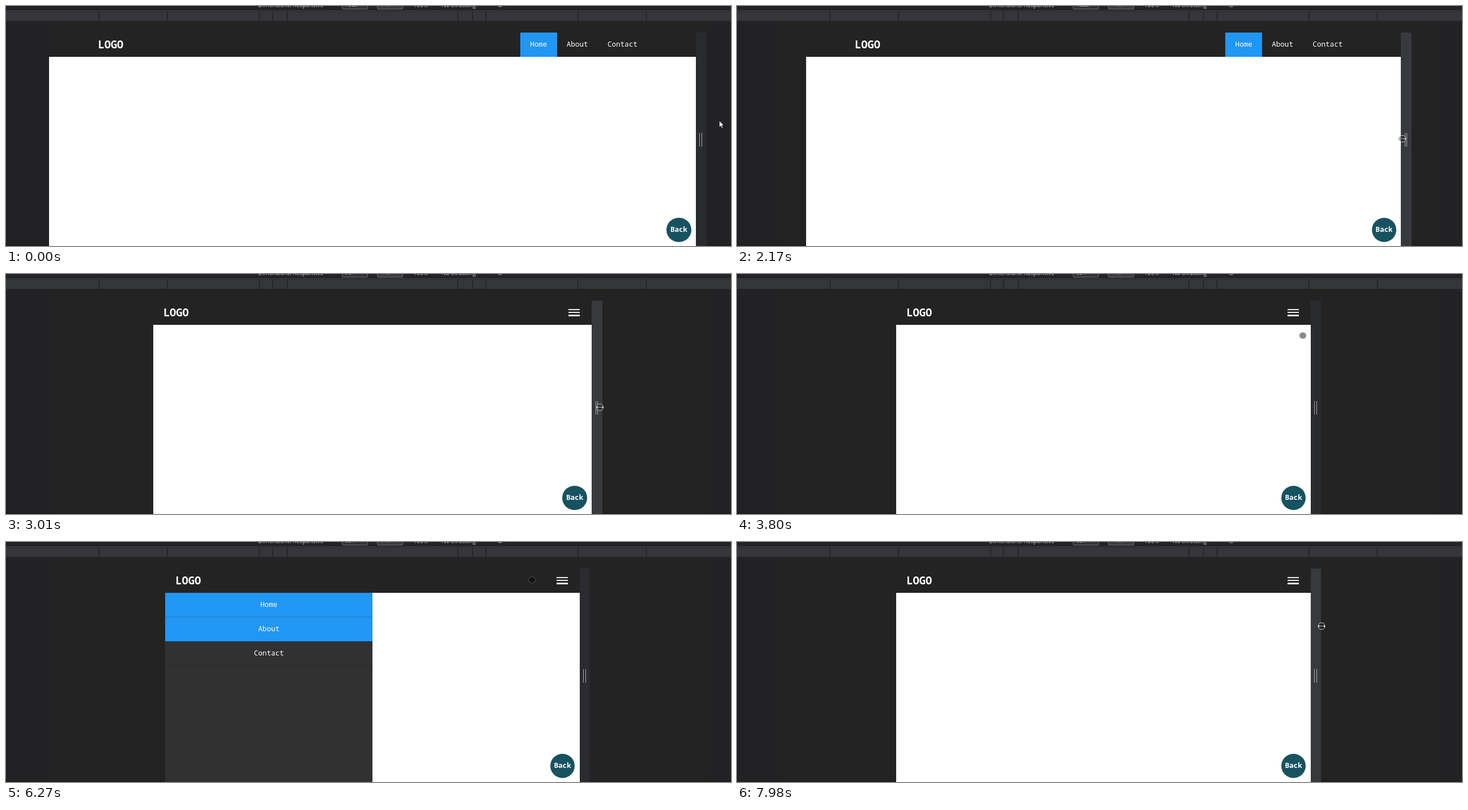
Write an HTML page that moves like this. It is 1280 by 425 pixels and loops after 8000 ms.

```html
<!DOCTYPE html>
<html lang="en">
<head>
<meta charset="utf-8">
<title>Responsive navigation</title>
<style>
/* --w: emulated width in CSS px, shown at a zoom of .8593 */
@property --w { syntax: "<integer>"; inherits: true; initial-value: 1329; }
@property --slide { syntax: "<percentage>"; inherits: true; initial-value: -100%; }
@property --about { syntax: "<color>"; inherits: true; initial-value: #313131; }
@property --bar { syntax: "<color>"; inherits: true; initial-value: #2a2b2e; }

html, body { margin: 0; width: 100%; height: 100%; overflow: hidden; background: #222225; }
.stage {
  --half: calc(var(--w) * .42965px);
  position: relative; width: 1280px; height: 425px; overflow: hidden;
  background: linear-gradient(#232323, #232323) 76px 27px / 1164px 398px no-repeat #222225;
  color: #fff; font: 500 12.6px "Noto Sans Mono", monospace;
  animation: resize 8s infinite linear, slide 8s infinite linear,
    about 8s infinite linear, bar 8s infinite step-end;
}
.stage div, .stage span, .stage svg { position: absolute; }
.floor { left: 0; bottom: 0; width: 100%; height: 3px; background: #211d20; }

/* device toolbar and ruler */
.tools { top: 0; left: 0; width: 100%; height: 8px; overflow: hidden; background: #232325;
  font: 10.2px/14px "Open Sans", sans-serif; color: #c8c9cb; }
.tools span { top: -9.2px; white-space: nowrap; }
.tools .field { top: -12px; box-sizing: border-box; width: 46px; height: 18px; padding: 2px 5px;
  line-height: 13px; border: 1px solid #6b6c6f; border-radius: 2px; background: #333437; }
.tools .off { color: #77787b; background: #3b3c3f; }
.w::before { counter-reset: w var(--w); content: counter(w); }
.ruler { top: 8px; left: 0; width: 100%; height: 19px;
  background: linear-gradient(#48494c 1px, #232325 1px 2px, #35363a 2px 18px, #2a2a2d 18px); }

/* emulated page */
.page { top: 47px; left: calc(647px - var(--half)); width: calc(var(--half) * 2); height: 378px;
  overflow: hidden; background: #fff; container-type: inline-size; }
.head { top: 0; left: 0; width: 100%; height: 43px; background: #232323; }
.logo { left: 86.5px; top: -.7px; font-size: 18.7px; font-weight: 700; line-height: 43px; }
.burger { display: none; right: 21px; top: 15px; width: 20px; height: 12.5px;
  background: linear-gradient(#ececec 2px, #0000 2px 5.2px, #ececec 5.2px 7.2px, #0000 7.2px 10.5px, #ececec 10.5px); }
ul { position: absolute; top: 0; right: 86px; margin: 0; padding: 0; display: flex; list-style: none; }
li { box-sizing: border-box; height: 43px; padding: 0 17.2px; line-height: 41.4px; }
li.on { background: #2196f3; }
.back { right: 8.3px; bottom: 7px; width: 43.4px; height: 43.4px; border-radius: 50%;
  background: #175260; font-weight: 700; line-height: 42.4px; text-align: center; }

@container (max-width: 825px) {
  .logo { left: 18px; }
  .burger { display: block; }
  ul { top: 43px; left: var(--slide); right: auto; width: 50%; height: 335px;
    display: block; background: #313131; }
  li { height: 42.95px; padding: 0; text-align: center; border-bottom: 1px solid #0002; }
  li.tap { background: var(--about); }
}

.bar { top: 47px; left: calc(647px + var(--half)); width: 18.4px; height: 378px; background: var(--bar); }
.bar span { left: 6.4px; top: 178px; width: 2.6px; height: 24px; border: solid #a9a9ab; border-width: 0 1.7px; }

/* pointer: its origin is the hot spot */
.pointer { left: 0; top: 0; animation: move 8s infinite linear; }
.pointer svg { left: -10px; top: -10px; }
.arrow { animation: arrow 8s infinite step-end; }
.grip { animation: grip 8s infinite step-end; }
.dot { animation: dot 8s infinite step-end; }

@keyframes resize {
  0%, 22% { --w: 1329; animation-timing-function: cubic-bezier(.5, .3, .75, .7); }
  27.125% { --w: 1223; }
  32%, 32.375% { --w: 1043; }
  33.5% { --w: 1017; animation-timing-function: cubic-bezier(.3, .4, .6, 1); }
  41.75%, 100% { --w: 851; }
}
@keyframes slide {
  0%, 53.25% { --slide: -100%; animation-timing-function: ease; }
  59.5%, 84.125% { --slide: 0%; animation-timing-function: ease; }
  90.375%, 100% { --slide: -100%; }
}
@keyframes about {
  0%, 67.1% { --about: #313131; animation-timing-function: ease; }
  70%, 100% { --about: #2196f3; }
}
@keyframes bar {
  0%, 46.25% { --bar: #2a2b2e; }
  15%, 94.7% { --bar: #38393d; }
  100% { --bar: #38393d; }
}
@keyframes move {
  0%, 12% { transform: translate(1259px, 203px); animation-timing-function: ease-in-out; }
  15.75%, 22% { transform: translate(1232px, 234px); animation-timing-function: cubic-bezier(.5, .3, .75, .7); }
  27.125% { transform: translate(1175px, 235px); }
  32%, 32.375% { transform: translate(1107px, 236px); }
  33.5% { transform: translate(1095.5px, 236px); animation-timing-function: cubic-bezier(.3, .4, .6, 1); }
  41.75%, 44.875% { transform: translate(1028px, 236px); animation-timing-function: ease-in-out; }
  47.5%, 49.375% { transform: translate(999px, 109px); animation-timing-function: ease-in-out; }
  52.5%, 53.5% { transform: translate(983px, 68px); animation-timing-function: ease-in; }
  58% { transform: translate(826px, 134px); }
  59.375%, 59.75% { transform: translate(791px, 134px); animation-timing-function: ease-out; }
  61.5%, 63.75% { transform: translate(585px, 143px); animation-timing-function: ease-in-out; }
  65.25%, 68% { transform: translate(583px, 172px); animation-timing-function: ease-in-out; }
  75%, 77.25% { transform: translate(908px, 68px); animation-timing-function: ease-in; }
  78.375% { transform: translate(928px, 67px); animation-timing-function: ease-out; }
  82%, 93.625% { transform: translate(989px, 68px); animation-timing-function: ease-in-out; }
  95.5% { transform: translate(1032px, 145px); animation-timing-function: step-end; }
  99.75%, 100% { transform: translate(1032px, 149px); }
}
@keyframes arrow { 0% { opacity: 1; } 15%, 100% { opacity: 0; } }
@keyframes grip { 0%, 46.25% { opacity: 0; } 15%, 94.7%, 100% { opacity: 1; } }
@keyframes dot { 0%, 94.7%, 100% { opacity: 0; } 46.25% { opacity: 1; } }
</style>
</head>
<body>
<div class="stage">
  <div class="floor"></div>

  <div class="tools">
    <span style="left:445px">Dimensions: Responsive</span>
    <span class="field w" style="left:593px"></span>
    <span style="left:644px;color:#77787b">×</span>
    <span class="field off" style="left:655px">442</span>
    <span style="left:719px">100%</span>
    <span style="left:769px">No throttling</span>
    <svg style="left:866px;top:-8px" width="13" height="13"><circle cx="6.5" cy="5.5" r="4" fill="none" stroke="#8a8b8d" stroke-width="1.5"/></svg>
  </div>
  <div class="ruler">
    <svg width="1280" height="19"><path stroke="#222225" stroke-width="1.4" d="M164.5 2v16M285 2v16M447.5 2v16M470.5 2v16M496.5 2v16M797.5 2v16M823.5 2v16M847.5 2v16M1009.5 2v16M1130.5 2v16"/></svg>
  </div>

  <div class="page">
    <div class="head">
      <span class="logo">LOGO</span>
      <span class="burger"></span>
    </div>
    <ul><li class="on">Home</li><li class="tap">About</li><li>Contact</li></ul>
    <div class="back">Back</div>
  </div>
  <div class="bar"><span></span></div>

  <div class="pointer">
    <svg class="arrow" width="24" height="26" viewBox="-10 -10 24 26">
      <path d="M.5 .5v11l2.5-2.3 1.8 4 1.8-.8-1.8-3.9h3.4z" fill="#fff" stroke="#111" stroke-width=".6"/>
    </svg>
    <svg class="grip" width="20" height="20" viewBox="-10 -10 20 20">
      <circle r="6" fill="#0003" stroke="#cfcfcf"/>
      <path d="M-7.3 0l3.3-2.8v2.1h8v-2.1l3.3 2.8-3.3 2.8v-2.1h-8v2.1z" fill="#fff" stroke="#1a1a1a" stroke-width=".6"/>
    </svg>
    <svg class="dot" width="20" height="20" viewBox="-10 -10 20 20">
      <ellipse rx="5.9" ry="5.5" fill="#00000075" stroke="#8886" stroke-width="1.2"/>
    </svg>
  </div>
</div>
</body>
</html>
```
